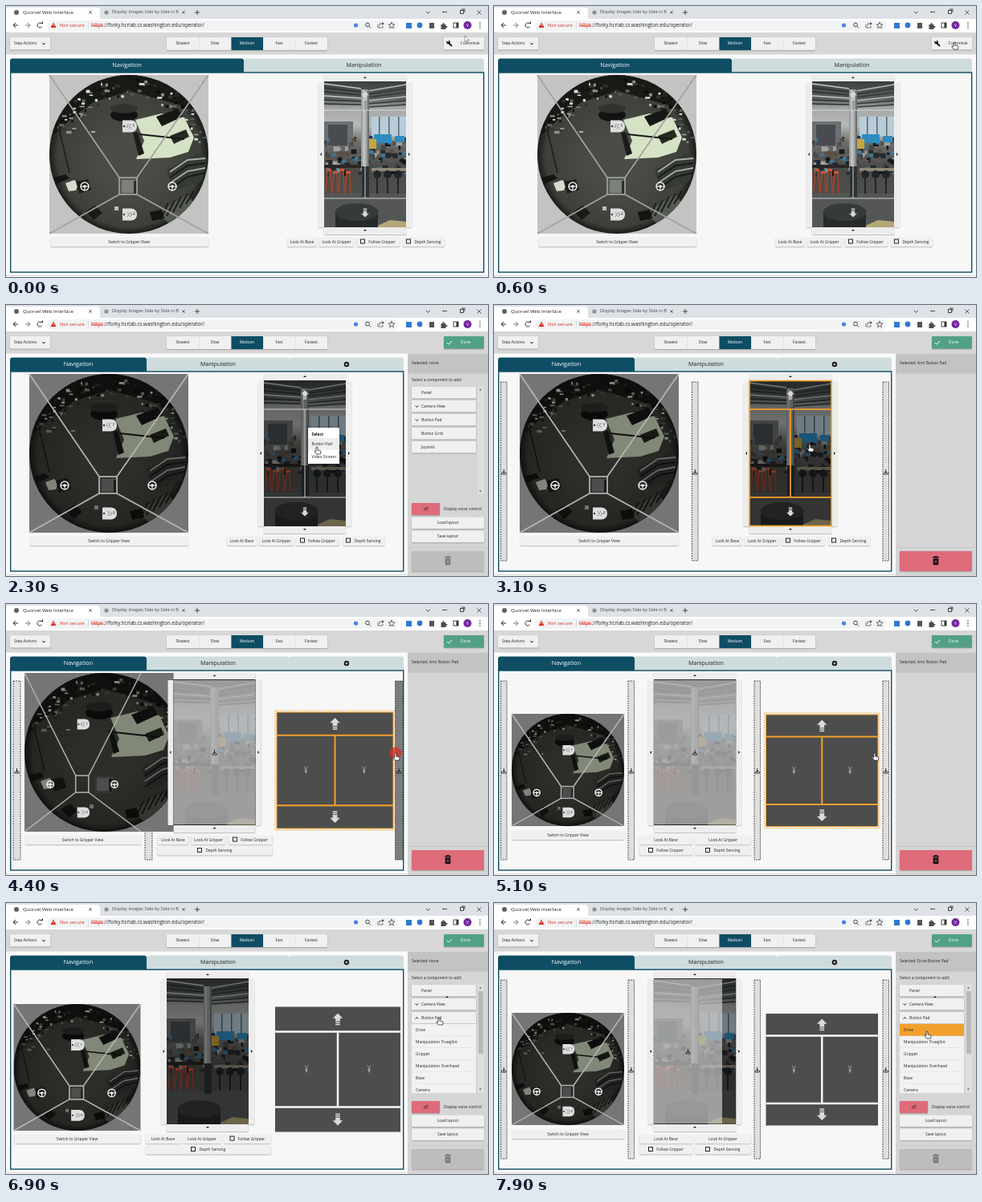
Animation, 600 px wide and 338 px high, one loop 8 s. Source, as an HTML page with a canvas:

```html
<!DOCTYPE html>
<html lang="en">
<head>
<meta charset="utf-8">
<title>Operator interface</title>
<style>
html, body { margin: 0; width: 600px; height: 338px; overflow: hidden; }
canvas { display: block; }
</style>
</head>
<body>
<canvas id="stage" width="600" height="338"></canvas>
<script>
const c = document.getElementById('stage').getContext('2d');
const BLUE = '#0e4d64', INK = '#222', ORANGE = '#f2a02c', RED = '#de6c7b';
const EDIT = 740, POPUP = 2000, PICK = 2500, DROP = 4300, SETTLE = 4600,
      CLEAR = 5500, EXPAND = 6700, DRIVE = 7500;

// ---- helpers ----
function box(x, y, w, h, fill) { c.fillStyle = fill; c.fillRect(x, y, w, h); }
function round(x, y, w, h, r, fill) {
  c.fillStyle = fill; c.beginPath(); c.roundRect(x, y, w, h, r); c.fill();
}
function text(s, x, y, size = 4.9, color = INK, align = 'left', style = '') {
  c.font = `${style} ${size}px "Open Sans", "Noto Sans", sans-serif`;
  c.fillStyle = color; c.textAlign = align; c.textBaseline = 'middle';
  c.fillText(s, x, y);
}
function mid(s, x, y, size, color) { text(s, x, y, size, color, 'center'); }
function line(pts, color = INK, w = 1) {
  c.strokeStyle = color; c.lineWidth = w; c.beginPath();
  for (let i = 0; i < pts.length; i += 2) c.lineTo(pts[i], pts[i + 1]);
  c.stroke();
}
function poly(pts, fill) {
  c.fillStyle = fill; c.beginPath();
  for (let i = 0; i < pts.length; i += 2) c.lineTo(pts[i], pts[i + 1]);
  c.fill();
}
function oval(x, y, rx, ry, fill) {
  c.fillStyle = fill; c.beginPath(); c.ellipse(x, y, rx, ry, 0, 0, 7); c.fill();
}
function ring(x, y, r, color, w = 1) {
  c.strokeStyle = color; c.lineWidth = w; c.beginPath(); c.arc(x, y, r, 0, 7); c.stroke();
}
function path(d, x, y, fill, stroke, w = 1) {
  c.save(); c.translate(x, y);
  const p = new Path2D(d);
  if (fill) { c.fillStyle = fill; c.fill(p); }
  if (stroke) { c.strokeStyle = stroke; c.lineWidth = w; c.stroke(p); }
  c.restore();
}
function button(x, y, w, h, fill = '#f0f0f0') {
  c.save();
  c.shadowColor = 'rgba(0,0,0,.3)'; c.shadowBlur = 1.5; c.shadowOffsetY = .7;
  round(x, y, w, h, 1, fill);
  c.restore();
}
function dashed(x, y, w, h, fill, color = '#333') {
  box(x, y, w, h, fill);
  c.save(); c.setLineDash([2, 1]); c.strokeStyle = color; c.lineWidth = .8;
  c.strokeRect(x, y, w, h); c.restore();
}
function chevron(x, y, up) {
  const d = up ? -1 : 1;
  line([x - 1.8, y - d, x, y + d, x + 1.8, y - d], INK, 1);
}
function random(seed) {
  return () => (seed = seed * 16807 % 2147483647) / 2147483647;
}
const inside = (t, a, b) => t >= a && t < b;

// ---- browser frame ----
function browser() {
  box(0, 0, 600, 17, '#dee1e6');
  round(-4, 2, 121, 18, 4, '#fff');
  box(0, 16, 600, 17, '#fff');
  oval(13, 8, 3, 3, '#5f6368');
  text('Quorvel Web Interface', 21, 8, 6);
  oval(125, 8, 2.6, 2.6, '#8b9096');
  c.save(); c.beginPath(); c.rect(130, 0, 86, 16); c.clip();
  text('Display images Side by Side in B', 132, 8, 5.6, '#45494d');
  c.restore();
  for (const [x, r] of [[105, 1.7], [221, 1.7], [589, 2.6]]) {
    line([x - r, 8 - r, x + r, 8 + r], '#444', .8);
    line([x + r, 8 - r, x - r, 8 + r], '#444', .8);
  }
  line([235, 8, 241, 8], '#444'); line([238, 5, 238, 11], '#444');
  line([523, 7, 525.5, 9.2, 528, 7], INK, .8); line([543, 7.5, 549, 7.5], INK, .8);
  c.strokeStyle = INK; c.lineWidth = .8;
  c.strokeRect(565.5, 5.5, 4, 4); line([567, 4, 571, 4, 571, 8], INK, .8);

  line([9, 24, 15, 24]); line([12, 21, 9, 24, 12, 27]);
  line([24, 24, 30, 24], '#777'); line([27, 21, 30, 24, 27, 27], '#777');
  c.beginPath(); c.arc(42, 24, 3, .6, 5.6); c.strokeStyle = '#333'; c.stroke();
  poly([43, 22, 46, 22, 46, 19], '#333');
  round(51, 18, 438, 13, 6.5, '#f1f3f4');
  poly([55.5, 27, 59, 20.5, 62.5, 27], '#d93025');
  box(58.6, 22.7, .8, 2, '#fff');
  text('Not secure', 67, 24.5, 6.1, '#d93025');
  box(102, 20, .6, 9, '#ccc');
  text('https', 106, 24.5, 6.2, '#d93025');
  box(106, 24.5, 15, .8, '#d93025');
  text('://forky.hcrlab.cs.washington.edu/operator/', 121.5, 24.5, 6.2);
  oval(435.5, 24, 2.6, 2.6, '#4a82e8');
  ring(450, 23.5, 2.4, '#444'); line([452, 25.5, 454, 27.5], '#444');
  line([463, 23, 463, 27, 469, 27, 469, 25], '#555', .8);
  line([465, 25, 465, 22, 469, 22], '#555', .8); poly([468, 20, 471, 22, 468, 24], '#555');
  path('M0-4 1-1.2 4-1 1.7 .9 2.5 3.7 0 2.2-2.5 3.7-1.7 .9-4-1-1-1.2z', 480, 24, null, '#444', .8);
  box(498, 21, 7, 7, '#2f7bd0');
  oval(515, 24, 3.4, 3.4, '#3178d4');
  box(527, 21, 6, 7, '#555');
  path('M-3-2h2q-.5-2 1-2t1 2h2v2q2-.5 2 1t-2 1v2h-6z', 544.5, 25, '#4a4d51');
  c.strokeStyle = '#333'; c.lineWidth = .9; c.strokeRect(557, 21, 6, 6);
  box(560.5, 21, 2.5, 6, '#333');
  oval(574.5, 24, 5, 5, '#7426a0'); mid('V', 574.5, 24.3, 5, '#fff');
  for (const y of [21, 24, 27]) oval(590, y, .8, .8, '#333');
}

// ---- cameras ----
function roomFisheye(x, y, size, dim) {
  c.save();
  c.translate(x, y); c.scale(size / 198, size / 198);
  c.beginPath(); c.rect(0, 0, 198, 198); c.clip();
  box(0, 0, 198, 198, '#c3c3c3');
  c.beginPath(); c.arc(99, 99, 99, 0, 7); c.clip();
  const g = c.createRadialGradient(99, 110, 30, 99, 99, 99);
  g.addColorStop(0, '#4b4c46'); g.addColorStop(.85, '#3d3f39'); g.addColorStop(1, '#1a1c18');
  box(0, 0, 198, 198, g);
  poly([40, 0, 158, 0, 190, 45, 150, 34, 100, 20, 55, 34, 30, 52, 5, 75, 0, 40], '#181a16');
  // desks and shelves crowd the far rim
  const rnd = random(41), tones = ['#8c9484', '#30332f', '#dbe3cf', '#0e0f0d', '#5c6458'];
  for (let i = 0; i < 110; i++) {
    const a = 3.5 + rnd() * 2.6, r = 74 + rnd() * 23;
    box(99 + r * Math.cos(a), 99 + r * Math.sin(a), 1.5 + rnd() * 5, 1 + rnd() * 3, tones[i % 5]);
  }
  oval(93, 50, 17, 8, '#121311'); oval(93, 42, 17, 6, '#30322e');
  poly([107, 56, 140, 48, 168, 53, 180, 78, 173, 96, 150, 103, 108, 105, 118, 82], '#d6e2c6');
  poly([133, 52, 160, 42, 166, 52, 140, 64], '#161815');
  poly([104, 72, 110, 71, 118, 98, 111, 101], '#1b1d19');
  poly([150, 76, 170, 68, 174, 77, 155, 86], '#262a23');
  line([112, 74, 168, 80], '#171916', 2);
  poly([146, 118, 185, 98, 197, 104, 190, 132, 154, 145], '#363a35');
  for (let i = 0; i < 4; i++)
    line([150, 121 + i * 7, 172, 106 + i * 7, 194, 104 + i * 6], i % 2 ? '#16181a' : '#a8afa5', 1.8);
  poly([134, 172, 172, 149, 180, 160, 150, 186], '#555a52');
  for (let i = 0; i < 5; i++) line([138 + i * 8, 181 - i * 5, 148 + i * 8, 160 - i * 4], '#1d201b', 2);
  poly([125, 171, 140, 168, 143, 179, 128, 182], '#141512');
  poly([20, 135, 31, 131, 36, 136, 33, 144, 24, 145], '#d8dccd');
  poly([33, 133, 48, 130, 52, 143, 37, 148], '#1c1e1a');
  poly([5, 128, 20, 124, 25, 129, 9, 136], '#151614');
  poly([45, 170, 57, 163, 66, 172, 55, 181], '#191a18');
  line([12, 67, 25, 122], '#1c1e1b', 1.5);
  box(52, 70, 5, 2, '#aab0a0');
  box(87, 128, 23, 22, '#555a54'); box(90, 131, 17, 16, '#7c827b');
  box(105, 132, 4, 16, '#2b2f2b');
  box(81, 164, 5, 5, '#bbb');
  c.restore();
  if (dim) box(x, y, size, size, 'rgba(0,0,0,.4)');
}
function drivePad(x, y, w, h, edit) {
  const X = v => x + v * w / 198, Y = v => y + v * h / 198, k = Math.min(1, w / 170);
  const color = edit ? '#b6b6b4' : '#a2a2a0', lw = 1.7 * k;
  for (const [a, b, d, e] of [[0, 0, 87, 128], [198, 0, 109, 128], [0, 198, 87, 149], [198, 198, 109, 149]])
    line([X(a), Y(b), X(d), Y(e)], color, lw);
  c.strokeStyle = color; c.lineWidth = lw;
  c.strokeRect(X(87), Y(128), X(109) - X(87), Y(149) - Y(128));
  for (const [v, label, dir] of [[64, 'F', 1], [174, 'R', -1]]) {
    c.save(); c.translate(X(99), Y(v)); c.scale(k, k);
    path('M-8-7.5H3Q10-7 10 0T3 7.5H-8z', 0, 0, '#dedede');
    oval(-6, 0, 1.2, 1.2, '#333');
    for (const q of [-1.2, 2]) line([q + dir, -3, q - 2 * dir, 0, q + dir, 3], '#777', .9);
    text(label, 5, 0, 4.5, '#333');
    c.restore();
  }
  for (const v of [44, 153]) {
    const px = X(v), py = Y(139), r = 5 * k;
    ring(px, py, r, '#eee', 1.5); oval(px, py, 1.8 * k, 1.8 * k, '#eee');
    line([px - r, py, px + r, py], '#eee', 1.2); line([px, py, px, py + r], '#eee', 1.2);
  }
}
function roomArm(x, dim) {
  c.save(); c.translate(x, 94); c.beginPath(); c.rect(0, 0, 102, 182); c.clip();
  const g = c.createLinearGradient(0, 0, 0, 182);
  [[0, '#3b3f40'], [.12, '#5b5f5f'], [.18, '#a3a6a5'], [.3, '#b7bab9'], [.42, '#6b6c69'], [.6, '#4b4a46'], [.8, '#4e4f4d'], [1, '#636361']]
    .forEach(s => g.addColorStop(...s));
  box(0, 0, 102, 182, g);
  for (let i = 0; i < 6; i++) {
    line([0, 3 + i * 5, 46, 9 + i * 4], i % 3 ? '#2c3031' : '#c4caca', 1.5);
    line([102, 4 + i * 5, 55, 12 + i * 4], i % 3 ? '#333839' : '#b5bbbb', 1.6);
  }
  box(0, 50, 36, 30, '#6d7073'); box(5, 54, 24, 26, '#484c50');
  box(59, 44, 43, 27, '#b9cdd9');
  for (const v of [68, 80, 92]) box(v, 44, 1.5, 27, '#59656c');
  const rnd = random(77);
  const stuff = ['#1f2a36', '#3b789e', '#45494a', '#26292a', '#17191a', '#9da3a0', '#5b5047'];
  for (let i = 0; i < 110; i++)
    box(rnd() * 100, 68 + rnd() * 46, 2 + rnd() * 6, 2 + rnd() * 5, stuff[i % 7]);
  box(62, 66, 22, 11, '#2e8bc0'); box(88, 68, 12, 8, '#2e8bc0'); box(53, 72, 12, 12, '#c5a53d');
  box(0, 104, 46, 4, '#2a2725'); box(59, 108, 43, 4, '#8f8878');
  box(0, 140, 102, 42, '#555756');
  for (let i = 0; i < 4; i++) {
    const sx = 3 + i * 8, sy = 109 + i % 2 * 3;
    box(sx, sy, 6, 3, '#cf5330');
    line([sx + 1, sy + 3, sx - 1, sy + 28], '#a84329', 1.5);
    line([sx + 5, sy + 3, sx + 6, sy + 28], '#a84329', 1.5);
  }
  for (let i = 0; i < 3; i++) {
    oval(66 + i * 13, 116, 5, 5, '#20252a'); line([66 + i * 13, 119, 66 + i * 13, 140], '#20252a', 2);
  }
  box(46, 10, 10, 96, '#9a9d9d'); box(48, 10, 2, 96, '#bec1c0'); box(54, 10, 2, 96, '#6c7172');
  box(47, 106, 9, 38, '#2c3236');
  poly([62, 182, 82, 173, 102, 175, 102, 182], '#b4a878');
  box(14, 164, 53, 18, '#282b2c'); oval(40.5, 163, 27, 11, '#373a3b');
  c.restore();
  if (dim) box(x, 94, 102, 182, 'rgba(0,0,0,.4)');
}
function armFrame(cx) {
  const x = cx - 51;
  button(x, 86, 102, 9, '#ededed'); button(x, 276, 102, 9, '#ededed');
  button(x - 7, 95, 7, 181, '#ededed'); button(x + 102, 95, 7, 181, '#ededed');
  poly([cx - 2, 90, cx + 2, 90, cx, 88], INK);
  poly([cx - 2, 279, cx + 2, 279, cx, 281], INK);
  poly([x - 3, 183, x - 3, 187, x - 5, 185], INK);
  poly([x + 105, 183, x + 105, 187, x + 107, 185], INK);
}
function arrow(x, y, dir, k) {
  c.save(); c.translate(x, y); c.scale(k, k * dir);
  poly([0, -6, 5, -1, 2.3, -1, 2.3, 2, -2.3, 2, -2.3, -1, -5, -1], '#dadada');
  box(-2.3, 2.7, 4.6, 1.2, '#dadada'); box(-2.3, 4.6, 4.6, 1.2, '#dadada');
  c.restore();
}
function armPad(x, y, w, h, solid, color, lw) {
  const a = y + h * .198, b = y + h * .802, m = x + w / 2;
  if (solid) {
    box(x, y, w, h, '#4d4d4d');
    for (const s of [-1, 1]) {
      const gx = m + s * w / 4, gy = y + h / 2;
      line([gx - 2, gy - 5, gx, gy, gx + 2, gy - 5], '#aaa', .8);
      line([gx, gy, gx, gy + 4], '#bbb', 1);
      ring(gx, gy + 1, 1.2, '#bbb', .7);
    }
  }
  line([x, a, x + w, a], color, lw); line([x, b, x + w, b], color, lw);
  line([m, a, m, b], color, lw);
  const k = solid ? 1.25 : .95;
  arrow(m, y + h * .1, 1, k); arrow(m, y + h * .9, -1, k);
}

// ---- page layout over time ----
// options: [left, right, row, label, checkbox]
const wide = [[-97, -60, 0, 'Look At Base'], [-57, -14, 0, 'Look At Gripper'],
  [-11, 43, 0, 'Follow Gripper', 1], [47, 99, 0, 'Depth Sensing', 1]];
const stacked = [[-71, -32, 0, 'Look At Base'], [-29, 14, 0, 'Look At Gripper'],
  [17, 72, 0, 'Follow Gripper', 1], [-71, 72, 1, 'Depth Sensing', 1]];
const loose = [[-77, -34, 0, 'Look At Base'], [-31, 17, 0, 'Look At Gripper'],
  [20, 79, 0, 'Follow Gripper', 1], [-77, 79, 1, 'Depth Sensing', 1]];
const grid = [[-69, -3, 0, 'Look At Base'], [0, 70, 0, 'Look At Gripper'],
  [-69, -3, 1, 'Follow Gripper', 1], [0, 70, 1, 'Depth Sensing', 1]];

function layout(t, slide) {
  if (t < PICK) {
    const w = 588 - slide;
    return { x: 6 + w / 4 - 99, y: 86, size: 198, w: 198, h: 198, sy: 289, arm: 6 + w * .75, options: wide };
  }
  if (t < DROP) return { x: 32, y: 86, size: 198, w: 198, h: 198, sy: 289, arm: 369, options: wide, zones: [8.5, 246.5, 484] };
  if (t < SETTLE) return { x: 23, y: 86, size: 198, w: 145, h: 198, sy: 289, arm: 259.5, options: stacked,
    pad: [337, 135, 145], zones: [9, 173, 484.5], zw: 9 };
  if (inside(t, CLEAR, DRIVE)) return { x: 9.5, y: 126, size: 158, w: 158, h: 158, sy: 289, arm: 251, options: loose, pad: [335, 129.5, 156] };
  return { x: 22, y: 137, size: 140, w: 140, h: 140, sy: 283, arm: 250, options: grid,
    pad: [338.5, 138, 139.5], zones: [8.5, 167, 324, 484] };
}
function dropIcon(x, y) {
  line([x, y - 3, x, y + 1]); poly([x - 2, y, x + 2, y, x, y + 2], INK);
  line([x - 2.6, y + 1, x - 2.6, y + 3, x + 2.6, y + 3, x + 2.6, y + 1], INK, .9);
}
function workspace(t, slide) {
  const edit = t >= EDIT, right = 595 - slide, armSelected = inside(t, PICK, CLEAR);
  const L = layout(t, slide);
  box(0, 60, 600, 278, '#fafafa');
  box(0, 336, 600, 1, '#d8d8d8');

  const a = edit ? 5 + (right - 5) * .347 : 296, b = edit ? 5 + (right - 5) * .71 : 595;
  round(a, 65.5, b - a, 18, [3, 3, 0, 0], '#cfdcdd');
  if (edit) {
    round(b, 65.5, right - b, 18, [3, 3, 0, 0], '#cfdcdd');
    const px = (b + right) / 2;
    oval(px, 74, 3.2, 3.2, '#111');
    line([px - 1.8, 74, px + 1.8, 74], '#eee', .8); line([px, 72.2, px, 75.8], '#eee', .8);
  }
  round(5, 65.5, a - 5, 18, [3, 3, 0, 0], BLUE);
  mid('Navigation', (5 + a) / 2, 74.5, 7.3, '#fff');
  mid('Manipulation', (a + b) / 2, 74.5, 7.1);
  box(5.5, 83, right - 5.5, 249, '#f7f7f7');
  c.strokeStyle = BLUE; c.lineWidth = 1.4; c.strokeRect(5.7, 83, right - 6, 249);

  (L.zones || []).forEach((x, i, all) => {
    const hot = inside(t, 4200, SETTLE) && i === all.length - 1;
    dashed(x, 96, L.zw || 7.5, 223, hot ? '#7c7c7c' : '#dfdfdf');
    dropIcon(x + (L.zw || 7.5) / 2, 208);
  });

  roomFisheye(L.x, L.y, L.size, edit);
  drivePad(L.x, L.y, L.w, L.h, edit);
  button(L.x + 1, L.sy, L.w - 1, 11);
  mid('Switch to Gripper View', L.x + L.w / 2, L.sy + 5.6);

  armFrame(L.arm);
  const ax = L.arm - 51;
  roomArm(ax, edit);
  if (!L.pad) {
    armPad(ax, 94, 102, 182, false, armSelected ? ORANGE : '#dedede', armSelected ? 1.7 : .9);
    if (armSelected) { c.strokeStyle = ORANGE; c.lineWidth = 1.7; c.strokeRect(ax, 94.5, 102, 181); }
  } else {
    if (L.zones) {
      const w = t >= DRIVE ? 85 : 102;
      dashed(ax, 95, 102, 180, 'rgba(0,0,0,0)');
      box(ax, 95, w, 180, 'rgba(215,215,215,.65)');
      dropIcon(ax + w / 2, 185);
    }
    const [x, y, w] = L.pad;
    armPad(x, y, w, w, true, armSelected ? ORANGE : '#f7f7f7', armSelected ? 2 : 2.5);
    if (armSelected) {
      c.strokeStyle = ORANGE; c.lineWidth = 1; c.strokeRect(x, y, w, w);
      dashed(x - 2, y - 2, w + 4, w + 4, 'rgba(0,0,0,0)', ORANGE);
    }
  }
  for (const [l, r, row, label, check] of L.options) {
    const x = L.arm + l, w = r - l, y = 289 + row * 13.5;
    button(x, y, w, 11);
    mid(label, x + w / 2 + (check ? 5 : 0), y + 5.6);
    if (check) {
      const cx = x + w / 2 - 19;
      c.strokeStyle = '#111'; c.lineWidth = .9; c.strokeRect(cx - 2.5, y + 2, 5, 5);
    }
  }
  if (inside(t, POPUP, PICK)) {
    c.save(); c.shadowColor = 'rgba(0,0,0,.4)'; c.shadowBlur = 3;
    box(376, 153, 39, 45, '#fff'); c.restore();
    text('Select', 380.5, 162, 4.9, '#111', 'left', 'bold');
    box(376, 166, 39, 14.5, '#ededed');
    text('Button Pad', 380.5, 173.5); text('Video Stream', 380.5, 190);
  }
}

// ---- header and side panel ----
function header(t) {
  box(0, 33, 600, 27.5, '#d7d7d7');
  button(5, 39, 50, 15.5); text('Step-Actions', 10, 47); chevron(47, 47);
  button(200, 39, 200, 16);
  box(280, 39, 40, 16, BLUE);
  ['Slowest', 'Slow', 'Medium', 'Fast', 'Fastest'].forEach((s, i) => {
    if (i) box(200 + i * 40, 39, .5, 16, '#d4d4d4');
    mid(s, 220 + i * 40, 47.2, 4.8, i === 2 ? '#fff' : INK);
  });
  const edit = t >= EDIT;
  button(545, 39, 50, 15.5, edit ? (t < 1300 ? '#3f9277' : '#52a187') : '#f0f0f0');
  if (edit) {
    line([549, 47, 551, 49, 555, 45], '#fff', 1); mid('Done', 572, 47.2, 4.9, '#fff');
  } else {
    line([550, 45, 555, 50], '#111', 1.8);
    c.beginPath(); c.arc(550.5, 45, 1.7, -1.2, 3.8); c.strokeStyle = '#111'; c.lineWidth = 1.4; c.stroke();
    mid('Customize', 577.5, 47.2);
  }
}
// The panel grows from the right edge and its contents fill its width.
function sidebar(t, slide) {
  if (!slide) return;
  const arm = inside(t, PICK, CLEAR), open = t >= EXPAND, drive = t >= DRIVE;
  const x = 600 - slide, l = x + 5, full = Math.max(0, slide - 10), item = Math.max(0, slide - 20);
  const center = l + full / 2;
  c.save(); c.beginPath(); c.rect(x, 60, slide, 278); c.clip();
  box(x, 60.5, slide, 277.5, '#d5d5d5');
  box(x, 60.5, slide, 25, '#c3c3c3');
  text('Selected: ' + (arm ? 'Arm Button Pad' : drive ? 'Drive Button Pad' : 'none'), l, 73);
  if (!arm) {
    text('Select a component to add:', l, 94);
    c.save(); c.beginPath(); c.rect(x + 4, 101, item + 2, 136); c.clip();
    const names = ['Panel', 'Camera View', 'Button Pad'];
    if (!open) names.push('Button Grid', 'Joystick');
    names.forEach((s, i) => {
      const y = 102 + i * 17;
      button(l, y, item, 14.5);
      text(s, l + 12, y + 7.7);
      if (i === 1 || i === 2) chevron(l + 6.5, y + 7.5, open && i === 2);
    });
    if (open) {
      ['Drive', 'Manipulation Trueglint', 'Gripper', 'Manipulation Overhead', 'Base', 'Camera'].forEach((s, i) => {
        const y = 151 + i * 15;
        box(l, y, item, 14.6, !i && t >= 7300 ? ORANGE : '#f2f2f2');
        text(s, l + 5, y + 7.7);
      });
      poly([547, 118, 551, 118, 549, 116], INK);
    }
    c.restore();
    box(587, 101, 8, 136, '#dedede');
    if (open) box(588, 110, 6, 78, '#b9b9b9');
    poly([589, 106.5, 592, 106.5, 590.5, 104.5], '#555');
    poly([589, 231.5, 592, 231.5, 590.5, 233.5], '#555');
    button(l, 247, 35, 15, RED);
    text('off', l + 17.5, 254.8, 4.9, INK, 'center', 'italic');
    text('Display voice control', l + 40, 254.8);
    button(l, 264.5, full, 14.5); mid('Load layout', center, 272);
    button(l, 281.5, full, 14.5); mid('Save layout', center, 289);
  }
  box(x, 302, slide, .7, '#c4c4c4');
  button(l, 307, full, 25, arm ? RED : '#bdbdbd');
  c.translate(center, 319);
  const ink = arm ? '#111' : '#777', hole = arm ? RED : '#bdbdbd';
  box(-4, -5, 8, 1.4, ink); box(-1.5, -6, 3, 1, ink);
  round(-3.3, -2.7, 6.6, 8, 1, ink);
  line([-1.4, -.4, 1.4, 2.8], hole, .8); line([1.4, -.4, -1.4, 2.8], hole, .8);
  c.restore();
}

// ---- pointer ----
const route = [[0, 571, 37], [400, 573, 45], [1200, 573, 46], [1800, 376, 153], [2000, 376, 153],
  [2300, 387, 177], [2500, 387, 175], [3100, 393, 174], [3300, 393, 174], [4100, 485, 186],
  [4600, 485, 186], [5200, 473, 186], [5900, 473, 186], [6500, 539, 143], [6900, 539, 143],
  [7300, 539, 160], [8000, 539, 160]];
function pointer(t) {
  const i = route.findIndex(k => k[0] > t), [t0, x0, y0] = route[i - 1], [t1, x1, y1] = route[i];
  const p = (t - t0) / (t1 - t0), e = p * p * (3 - 2 * p);
  const x = x0 + (x1 - x0) * e, y = y0 + (y1 - y0) * e;
  if ([EDIT, POPUP, PICK, DROP, CLEAR, EXPAND, DRIVE].some(k => inside(t, k - 60, k + 160)))
    oval(x, y, 7.5, 7.5, 'rgba(220,45,35,.75)');
  if (t < 300)
    path('M0 0v8l2-1.8 1.4 3 1.2-.6-1.4-2.9h2.7z', x, y, '#fff', '#555', .6);
  else
    path('M-1 .5Q0-1 1 .5V4l3.2.8q1 .3.8 1.3L4.4 9H-.6L-3.3 5.6Q-2.8 4.4-1 5.6z', x, y, '#fff', '#111', .7);
}

function draw() {
  const now = performance.now() % 8000, t = now - now % 100;
  const p = Math.min(1, Math.max(0, (t - EDIT) / 500));
  const slide = 100 * (1 - (1 - p) ** 2);
  workspace(t, slide);
  sidebar(t, slide);
  header(t);
  browser();
  pointer(t);
  requestAnimationFrame(draw);
}
draw();
</script>
</body>
</html>
```
